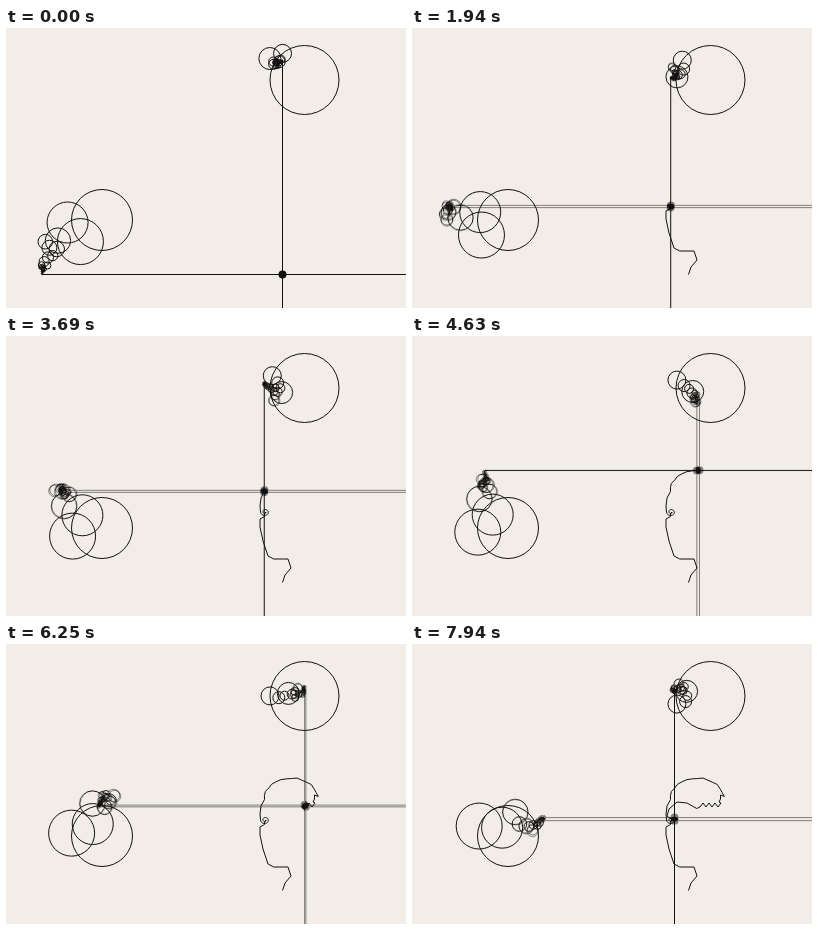
Animation of 400x280 px, one loop 8000 ms. Source, as an HTML page with a canvas:

```html
<!DOCTYPE html>
<html lang="en">
<head>
<meta charset="utf-8">
<title>Epicycle drawing</title>
<style>
  html, body { margin: 0; width: 100%; height: 100%; overflow: hidden; background: #f2ede7; }
  canvas { display: block; width: 400px; height: 280px; }
</style>
</head>
<body>
<canvas id="stage" width="400" height="280"></canvas>
<script>
const W = 400, H = 280, LOOP = 8000;
const STEP = 62.5;    // one shown picture: two poses a step apart, mixed equally
const OMEGA = 8.1;    // degrees per second of the slowest wheel
const PAPER = '#f2ede7', INK = '#111';

const stage = document.getElementById('stage').getContext('2d');
const layer = Object.assign(document.createElement('canvas'), { width: W, height: H }).getContext('2d');

const mix = (a, b, f) => a + (b - a) * f;
const polar = (r, degrees) => {
  const a = degrees * Math.PI / 180;
  return { r, x: r * Math.cos(a), y: r * Math.sin(a) };
};
const total = (arms, key) => arms.reduce((sum, a) => sum + a[key], 0);
const points = text => text.split(' ').map(p => p.split(',').map(Number));

// Elliptic arc; its size grows from `grow` to 1 and `rough` makes the edge uneven.
function arc(cx, cy, rx, ry, from, to, grow = 1, rough = 0) {
  const n = Math.ceil(Math.abs(to - from) / 12);
  return Array.from({ length: n + 1 }, (_, i) => {
    const size = mix(grow, 1, i / n) + rough * Math.sin(i * i);
    const p = polar(size, mix(from, to, i / n));
    return [cx + rx * p.x, cy + ry * p.y];
  });
}

function zigzag(x0, x1, y, height, n) {
  return Array.from({ length: n + 1 }, (_, i) => [mix(x0, x1, i / n), y + (i % 2 ? height : 0)]);
}

// Outline pieces with their end times; the pen crosses each at constant speed.
const outline = [{ x: 276.5, y: 246.5, t: 0 }];
function draw(end, pts) {
  const last = outline[outline.length - 1];
  const path = [[last.x, last.y], ...pts];
  let sum = 0;
  const along = path.map((p, i) => sum += i ? Math.hypot(p[0] - path[i - 1][0], p[1] - path[i - 1][1]) : 0);
  path.slice(1).forEach(([x, y], i) =>
    outline.push({ x, y, t: mix(last.t, end, along[i + 1] / sum) }));
}
draw(780, points('279,239 285,232 282,223 267.7,223'));                                 // neck, chin
draw(1910, points('262,220 257,205 254,191 254,183 258.5,180.5 258.5,178'));            // face
draw(3660, [...arc(259, 176, 4.5, 4, 0, 540, 0.2), ...points('254,170 255,162 258.5,155.5')]); // eye, brow
draw(5600, [...arc(285, 155.5, 27, 21.5, 190, 352, 1, 0.025), ...points('308.5,151 308.5,155')]); // crown
draw(6850, [[307, 158], ...zigzag(309, 288, 159, 4, 7), [284.7, 164.5]]);              // hair
draw(7940, points('275,159 265,158 257,165 255,172 262.5,177.5 262.5,173.5'));          // fringe

// Wheels as [speed, radius, phase]; `axis` is the pen coordinate the last wheel follows.
const left = {
  x: 96, y: 192, turn: 1, axis: 'y',
  wheels: [[1, 30.5, 135], [2, 23, 236], [3, 20.5, 118], [4, 12.7, 175], [5, 7.3, 56], [6, 7.5, 10]]
};
const upper = {
  x: 298.5, y: 52, turn: -1, axis: 'x',
  wheels: [[1, 34.5, 230.5], [2, 9, 112], [4, 6, 182], [5, 4.5, 222], [7.8, 11, 4]]
};

// Large wheels, then ever smaller ones that close the gap to the pen's coordinate.
function chain(set, t, pen) {
  const angle = set.turn * OMEGA * t / 1000;
  const main = set.wheels.map(([k, r, phase]) => polar(r, phase + angle * k));
  const tail = Array.from({ length: 22 }, (_, i) =>
    polar(5.5 * 0.88 ** i, 137 * (i + 1) ** 2 + angle * (i + 7)));
  const arms = [...main, ...tail];
  const gap = pen[set.axis] - set[set.axis] - total(arms, set.axis);
  const weight = total(tail, 'r');
  tail.forEach(a => a[set.axis] += gap * a.r / weight);
  return arms;
}

function drawnUntil(t) {
  const next = outline.findIndex(p => p.t > t);
  if (next < 0) return outline;
  const a = outline[next - 1], b = outline[next], f = (t - a.t) / (b.t - a.t);
  return [...outline.slice(0, next), { x: mix(a.x, b.x, f), y: mix(a.y, b.y, f) }];
}

function circle(c, x, y, r) {
  c.beginPath();
  c.arc(x, y, r, 0, Math.PI * 2);
}

function line(c, path) {
  c.beginPath();
  path.forEach(p => c.lineTo(p.x, p.y));
  c.stroke();
}

function drawWheels(c, set, t, pen) {
  let { x, y } = set;
  for (const a of chain(set, t, pen)) {
    circle(c, x, y, Math.hypot(a.x, a.y));
    c.stroke();
    x += a.x;
    y += a.y;
  }
  return { x, y };
}

function drawPose(c, t) {
  c.fillStyle = PAPER;
  c.fillRect(0, 0, W, H);
  c.fillStyle = c.strokeStyle = INK;
  c.lineWidth = 1;
  c.lineJoin = 'round';
  const trail = drawnUntil(t), pen = trail[trail.length - 1];
  line(c, trail);
  line(c, [drawWheels(c, left, t, pen), { x: W, y: pen.y }]);
  line(c, [drawWheels(c, upper, t, pen), { x: pen.x, y: H }]);
  circle(c, pen.x, pen.y, 4);
  c.fill();
}

function render(now) {
  const t = Math.floor((now % LOOP + 5) / STEP) * STEP % LOOP;
  drawPose(stage, t);
  drawPose(layer, Math.max(0, t - STEP));
  stage.globalAlpha = 0.5;
  stage.drawImage(layer.canvas, 0, 0);
  stage.globalAlpha = 1;
}

const start = performance.now();
function tick() {
  render(performance.now() - start);
  requestAnimationFrame(tick);
}
tick();
</script>
</body>
</html>
```
